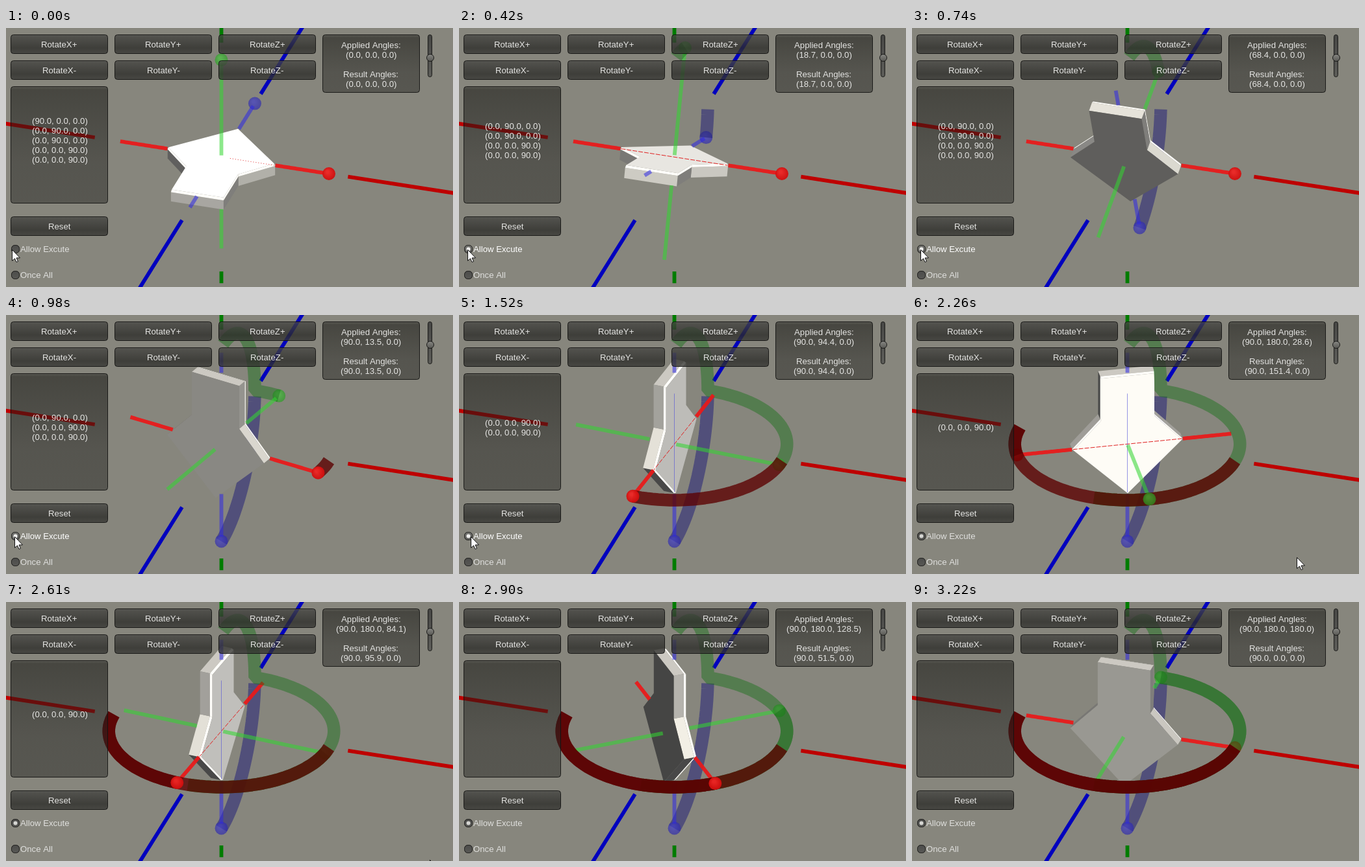
Write an HTML page with a canvas that moves like this. It is 688 px wide and 400 px high and loops after 4350 ms.

```html
<!DOCTYPE html>
<html lang="en">
<head>
<meta charset="utf-8">
<title>Rotation order</title>
<style>
  html, body { margin: 0; width: 100%; height: 100%; overflow: hidden; background: #87867d; }
  canvas { display: block; }
</style>
</head>
<body>
<canvas id="stage" width="688" height="400"></canvas>
<script>
const ctx = document.getElementById('stage').getContext('2d');
const LOOP = 4350, TURN = 567.5, RADIUS = 173.3, RAD = Math.PI / 180;
const TURN_STARTS = [302, 894.9, 1492.3, 2079.7, 2652];
const QUEUE = ['(90.0, 0.0, 0.0)', '(0.0, 90.0, 0.0)', '(0.0, 90.0, 0.0)', '(0.0, 0.0, 90.0)', '(0.0, 0.0, 90.0)'];

// Runs of evenly spaced screen updates: first, last, count.
const TICKS = [[0, 0, 1], [60, 420, 5], [480, 550, 2], [610, 980, 7], [1030, 1090, 2], [1150, 1520, 7],
  [1570, 1640, 2], [1720, 2200, 9], [2260, 2260, 1], [2310, 2610, 6], [2660, 2780, 3], [2830, 3220, 7]]
  .flatMap(([a, b, n]) => Array.from({ length: n }, (_, i) => a + (n > 1 ? (b - a) * i / (n - 1) : 0)));

const POINTER = [[0, 9, 342], [60, 9, 342], [300, 13, 342], [1400, 13, 342], [1500, 18, 342], [1720, 18, 342],
  [2200, 590, 366], [2260, 592, 374], [2610, 652, 398], [2700, 664, 405]];

const clamp = (v, lo, hi) => Math.max(lo, Math.min(hi, v));
const dot = (a, b) => a[0] * b[0] + a[1] * b[1] + a[2] * b[2];

// Orthographic camera: yaw 17.3, pitch 30.
const cy = Math.cos(17.28 * RAD), sy = Math.sin(17.28 * RAD), cp = Math.cos(30 * RAD), sp = 0.5;
const RIGHT = [cy, 0, sy], UP = [-sy * sp, cp, cy * sp], FORWARD = [-sy * cp, -sp, cy * cp];
const LIGHT = [0.321, 0.766, -0.557];
const project = p => [331.5 + dot(p, RIGHT), 199.3 - dot(p, UP)];

function anglesAt(d) {
  return [clamp(d, 0, 90), clamp(d - 90, 0, 180), clamp(d - 270, 0, 180)];
}

function rotate([x, y, z], angles) {
  const [a, b, c] = angles.map(v => v * RAD);
  [x, y] = [x * Math.cos(c) - y * Math.sin(c), x * Math.sin(c) + y * Math.cos(c)];
  [y, z] = [y * Math.cos(a) - z * Math.sin(a), y * Math.sin(a) + z * Math.cos(a)];
  [x, z] = [x * Math.cos(b) + z * Math.sin(b), z * Math.cos(b) - x * Math.sin(b)];
  return [x, y, z];
}

const UNIT = [[1, 0, 0], [0, 1, 0], [0, 0, 1]];
const along = (axis, s) => UNIT[axis].map(v => v * s);

function trace(points) {
  ctx.beginPath();
  points.forEach(([x, y], i) => i ? ctx.lineTo(x, y) : ctx.moveTo(x, y));
}

function strokePath(points, color, width) {
  trace(points);
  ctx.strokeStyle = color;
  ctx.lineWidth = width;
  ctx.stroke();
}

// Arrow block, outline in local x/z.
const OUTLINE = [[0, 87.5], [86.6, 0], [42.4, -48.5], [42.4, -125], [-42.4, -125], [-42.4, -48.5], [-86.6, 0]];
const TOP = 2.8, SHOULDER = -1, BOTTOM = -17.5;

function insideBlock([x, y, z]) {
  if (y > TOP || y < BOTTOM) return false;
  let inside = false;
  OUTLINE.forEach(([x1, z1], i) => {
    const [x2, z2] = OUTLINE[(i + 1) % OUTLINE.length];
    if ((z1 > z) !== (z2 > z) && x < (x2 - x1) * (z - z1) / (z2 - z1) + x1) inside = !inside;
  });
  return inside;
}

function shade(normal, base, gain) {
  const lit = Math.max(0, dot(normal, LIGHT)), c = base + gain * lit;
  return `rgb(${c},${c - 3 * lit},${c - 13 * lit})`;
}

function drawBlock(angles) {
  const turn = p => rotate(p, angles);
  const ring = (y, k = 1) => OUTLINE.map(([x, z]) => turn([x * k, y, z * k]));
  const top = ring(TOP, 0.985), shoulder = ring(SHOULDER), bottom = ring(BOTTOM);
  const up = turn([0, 1, 0]), topShown = dot(up, FORWARD) < 0;
  const faces = [];
  OUTLINE.forEach(([x, z], i) => {
    const j = (i + 1) % OUTLINE.length, [x2, z2] = OUTLINE[j];
    const len = Math.hypot(x2 - x, z2 - z);
    const side = turn([(z - z2) / len, 0, (x2 - x) / len]);
    const bevel = side.map((v, k) => v * 0.95 + up[k] * 0.3);
    const add = (points, normal, color) => {
      if (dot(normal, FORWARD) < 0)
        faces.push({ points, color, depth: points.reduce((s, p) => s + dot(p, FORWARD), 0) });
    };
    add([shoulder[i], shoulder[j], bottom[j], bottom[i]], side, shade(side, 72, 172));
    add([top[i], top[j], shoulder[j], shoulder[i]], bevel, '#fffefa');
  });
  faces.sort((a, b) => b.depth - a.depth);
  const down = up.map(v => -v);
  faces.push(topShown
    ? { points: top, color: angles[0] ? shade(up, 105, 232) : '#fff' }
    : { points: bottom, color: shade(down, 52, 182) });
  for (const { points, color } of faces) {
    trace(points.map(project));
    ctx.closePath();
    ctx.fillStyle = color;
    ctx.fill();
  }
  return topShown;
}

const ROD_COLORS = ['rgba(235,24,24,.92)', 'rgba(50,215,48,.56)', 'rgba(45,40,230,.55)'];

function drawRod(axis, angles) {
  const toCamera = UNIT.map(u => -dot(rotate(u, angles), FORWARD));
  let run = [];
  const flush = () => {
    if (run.length > 1) strokePath(run, ROD_COLORS[axis], 5.8);
    run = [];
  };
  for (let s = -163; s < 166; s += 2) {
    const p = along(axis, s);
    let hidden = false;
    for (let t = 0; t < 260 && !hidden; t += 4) hidden = insideBlock(p.map((v, i) => v + toCamera[i] * t));
    if (hidden) flush();
    else run.push(project(rotate(p, angles)));
  }
  flush();
}

// The rods graze the top face and show as hairlines.
function drawHairlines(d, angles) {
  const line = (axis, a, b, color, dash) => {
    ctx.setLineDash(dash);
    strokePath([a, b].map(s => project(rotate(along(axis, s), angles))), color, 1);
    ctx.setLineDash([]);
  };
  line(0, d ? -86 : 14, 86, '#e02020', d ? [7, 2] : [1, 3]);
  if (d >= 90) line(2, -90, 86, 'rgba(80,80,215,.6)', []);
}

const BALL_COLORS = [['rgba(238,38,36,.95)', 'rgba(205,10,10,.95)'], ['rgba(66,200,56,.66)', 'rgba(36,155,30,.66)'],
  ['rgba(62,58,205,.66)', 'rgba(42,38,170,.66)']];

function drawBall(axis, angles) {
  const [x, y] = project(rotate(along(axis, RADIUS), angles));
  const fill = ctx.createRadialGradient(x - 2, y - 3, 2, x, y, 11);
  BALL_COLORS[axis].forEach((c, i) => fill.addColorStop(i, c));
  ctx.fillStyle = fill;
  ctx.beginPath();
  ctx.arc(x, y, 10, 0, 7);
  ctx.fill();
}

const TRAILS = [
  { axis: 0, color: 'rgba(92,0,0,.78)', spans: [[90, 270], [270, 450]] },
  { axis: 1, color: 'rgba(24,112,24,.46)', spans: [[3, 270], [270, 450]] },
  { axis: 2, color: 'rgba(38,36,120,.55)', spans: [[3.4, 90]] }
];

function trailPoints(axis, from, to) {
  const points = [];
  for (let d = from; d < to; d += 3) points.push(rotate(along(axis, RADIUS), anglesAt(d)));
  points.push(rotate(along(axis, RADIUS), anglesAt(to)));
  return points;
}

function trailLayer({ axis, color, spans }, d) {
  const paths = spans.filter(([a]) => d > a).map(([a, b]) => trailPoints(axis, a, Math.min(b, d)));
  if (!paths.length) return null;
  const all = paths.flat();
  const center = [0, 1, 2].map(k => {
    const values = all.map(p => p[k]);
    return (Math.min(...values) + Math.max(...values)) / 2;
  });
  return { depth: dot(center, FORWARD), draw: () => paths.forEach(p => strokePath(p.map(project), color, 19.5)) };
}

function drawWorldAxes() {
  const colors = ['#be0000', '#007c00', '#0000be'];
  colors.forEach((color, axis) => [-1, 1].forEach(sign => {
    const end = axis === 1 ? (sign < 0 ? 225 : 232) : 460;
    strokePath([204, end].map(s => project(along(axis, s * sign))), color, 5.8);
  }));
}

function drawScene(d) {
  const angles = anglesAt(d);
  drawWorldAxes();
  const trails = TRAILS.map(t => trailLayer(t, d)).filter(Boolean);
  const balls = UNIT.map((u, axis) => ({
    depth: dot(rotate(along(axis, RADIUS), angles), FORWARD),
    draw: () => drawBall(axis, angles)
  }));
  const layers = [...trails, ...balls].sort((a, b) => b.depth - a.depth);
  layers.filter(l => l.depth > 0).forEach(l => l.draw());
  if (drawBlock(angles)) drawHairlines(d, angles);
  [2, 1, 0].forEach(axis => drawRod(axis, angles));
  layers.filter(l => l.depth <= 0).forEach(l => l.draw());
}

// Stops are [position, color] pairs from top to bottom.
function panel(x, y, w, h, stops, radius = 4) {
  const fill = ctx.createLinearGradient(0, y, 0, y + h);
  stops.forEach(([at, color]) => fill.addColorStop(at, color));
  ctx.beginPath();
  ctx.roundRect(x + 0.5, y + 0.5, w - 1, h - 1, radius);
  ctx.fillStyle = fill;
  ctx.fill();
  ctx.strokeStyle = 'rgba(18,18,17,.9)';
  ctx.lineWidth = 1;
  ctx.stroke();
}

function label(text, x, y, color = '#e4e4e2', centered = true) {
  const left = centered ? Math.round(x - ctx.measureText(text).width / 2) : x;
  ctx.fillStyle = color;
  ctx.fillText(text, left, y + 5);
}

const glass = (v, alpha) => `rgba(${v},${v},${v - 3},${alpha})`;
const BUTTON_FILL = [[0, glass(80, .78)], [.1, glass(66, .78)], [.5, glass(50, .78)], [.7, glass(42, .78)], [1, glass(55, .78)]];

function button(text, x, y) {
  panel(x, y, 150, 30, BUTTON_FILL);
  label(text, x + 75, y + 15);
}

function box(x, y, w, h) {
  panel(x, y, w, h, [[0, glass(50, .52)], [5 / h, glass(12, .52)], [.65, glass(38, .51)], [1, glass(40, .5)]]);
}

function toggle(text, y, on, hover) {
  panel(8, y - 6, 13, 13, [[0, hover ? '#777773' : '#4c4c4a'], [1, hover ? '#5c5c59' : '#585855']], 5);
  if (on) {
    ctx.fillStyle = hover ? '#f0f0ee' : '#d6d6d3';
    ctx.beginPath();
    ctx.arc(14.5, y + 0.5, 3, 0, 7);
    ctx.fill();
  }
  label(text, 22, y, hover ? '#fff' : '#e0e0de', false);
}

const triple = values => `(${values.map(v => v.toFixed(1)).join(', ')})`;

function drawInterface(t, d) {
  ctx.font = '13.2px "Liberation Sans", Arial, sans-serif';
  ['X', 'Y', 'Z'].forEach((axis, i) => {
    button(`Rotate${axis}+`, 7 + 160 * i, 10);
    button(`Rotate${axis}-`, 7 + 160 * i, 50);
  });
  box(7, 90, 150, 181);
  const waiting = QUEUE.slice(TURN_STARTS.filter(s => t >= s).length);
  waiting.forEach((text, i) => label(text, 83, Math.round(173 + 15 * (i - (waiting.length - 1) / 2))));
  button('Reset', 7, 291);

  const [x, y, z] = anglesAt(d);
  box(487, 10, 150, 90);
  label('Applied Angles:', 562, 26);
  label(triple([x, y, z]), 562, 41);
  label('Result Angles:', 562, 71);
  label(triple([x, y - z, 0]), 562, 86);

  panel(649, 10, 7, 66, [[0, '#464644'], [1, '#5c5c58']], 3);
  panel(647, 40, 12, 12, [[0, '#8a8a86'], [1, '#555551']], 5.5);
  toggle('Allow Excute', 341, t >= 290, t >= 60 && t < 1720);
  toggle('Once All', 381, false, false);
}

function drawPointer(t) {
  const next = POINTER.findIndex(k => k[0] > t);
  if (next < 0) return;
  const [t0, x0, y0] = POINTER[next - 1], [t1, x1, y1] = POINTER[next];
  const k = (t - t0) / (t1 - t0);
  const x = x0 + (x1 - x0) * k, y = y0 + (y1 - y0) * k;
  trace([[0, 0], [0, 17], [4, 13.5], [6.5, 19], [9, 18], [6.5, 12.5], [12, 12.5]].map(([a, b]) => [x + a + 0.5, y + b + 0.5]));
  ctx.closePath();
  ctx.fillStyle = '#fff';
  ctx.fill();
  ctx.strokeStyle = '#111';
  ctx.lineWidth = 1;
  ctx.stroke();
}

function render(time) {
  const t = TICKS.filter(tick => tick <= time).pop();
  const turned = TURN_STARTS.reduce((sum, s) => sum + 90 * clamp((t - s) / TURN, 0, 1), 0);
  ctx.fillStyle = '#87867d';
  ctx.fillRect(0, 0, 688, 400);
  ctx.lineJoin = 'bevel';
  drawScene(turned);
  drawInterface(t, turned);
  drawPointer(t);
}

const start = performance.now();
function loop() {
  render((performance.now() - start) % LOOP);
  requestAnimationFrame(loop);
}
loop();
</script>
</body>
</html>
```
